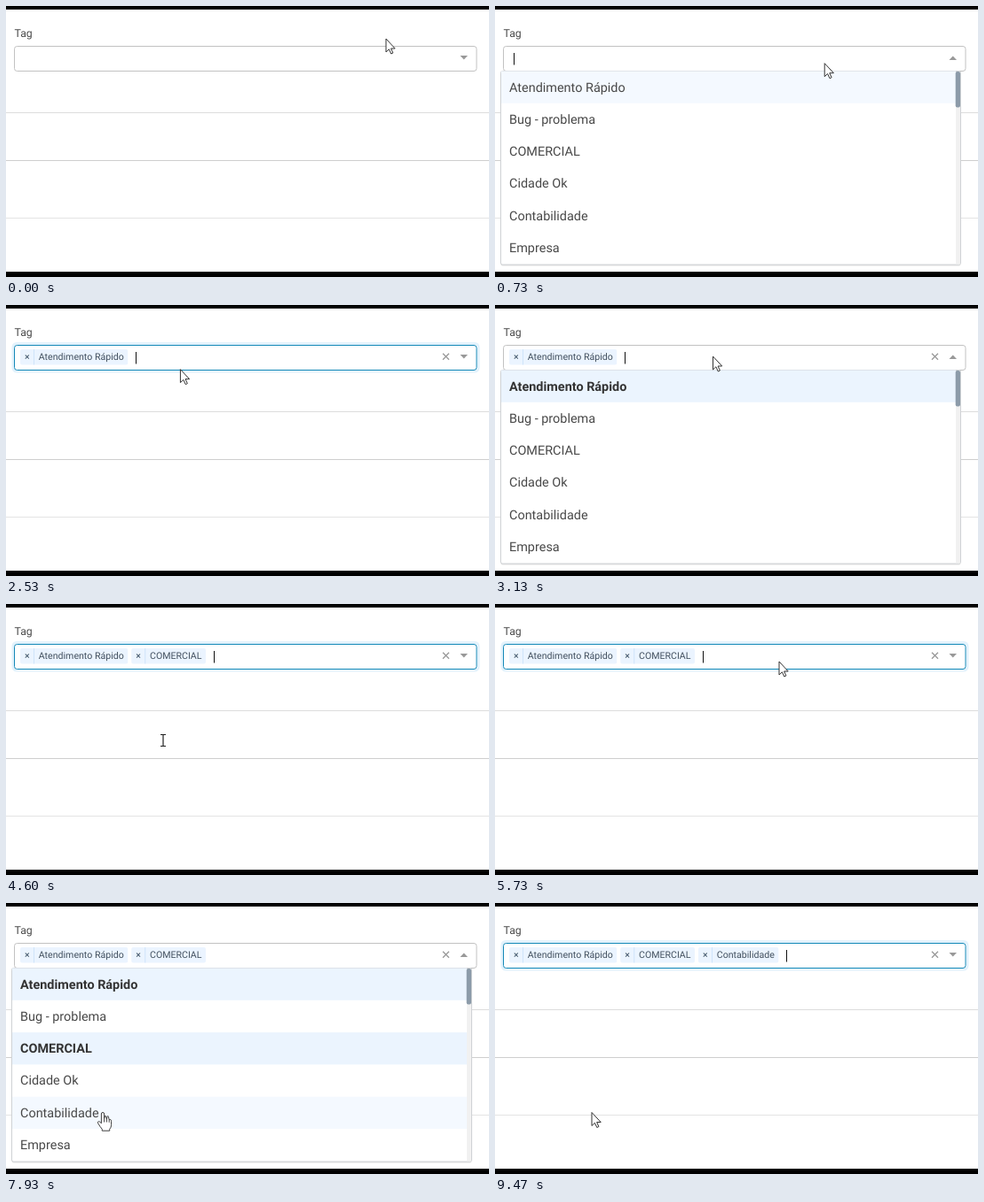
Animation of 544 by 306 pixels, one loop 9.99 s. Source, as an HTML page:

```html
<!DOCTYPE html>
<html lang="pt">
<head>
<meta charset="utf-8">
<title>Tag select</title>
<style>
html, body { margin: 0; width: 544px; height: 306px; overflow: hidden; background: #fff; }
svg { display: block; font-family: Roboto, sans-serif; text-rendering: geometricPrecision; }
</style>
</head>
<body>
<svg id="stage" width="544" height="306" viewBox="0 0 544 306"></svg>
<script>
const LOOP = 9990, STEP = 200 / 3, BLINK = 533;
const ROW = 36.3, MENU_TOP = 73.5, TAG_SIZE = 10.6;
const options = ['Atendimento Rápido', 'Bug - problema', 'COMERCIAL', 'Cidade Ok', 'Contabilidade', 'Empresa'];
const picks = [0, 2, 4];

// Clicks alternately open the menu and pick an option, which closes it.
const clicks = [470, 2000, 3000, 4600, 5800, 8130];

// Pointer moves: start, end, target x, target y
const home = [428, 37];
const moves = [
  [70, 330, 410, 60], [470, 1600, 121.5, 95], [2000, 2930, 245.5, 58], [3130, 4200, 177, 154],
  [4600, 5400, 320, 65], [6200, 6800, 117, 218], [6800, 7930, 109, 236.5]
];

const rect = (x, y, w, h, fill, more = '') =>
  `<rect x="${x}" y="${y}" width="${w}" height="${h}" fill="${fill}" ${more}/>`;
const text = (x, y, size, str, fill, weight = 400) =>
  `<text x="${x}" y="${y}" font-size="${size}" fill="${fill}" font-weight="${weight}">${str}</text>`;
const shape = (d, more) => `<path d="${d}" ${more}/>`;
const stroke = (color, width) => `fill="none" stroke="${color}" stroke-width="${width}"`;

const ruler = document.createElement('canvas').getContext('2d');
ruler.font = `${TAG_SIZE}px Roboto, sans-serif`;

function pointerAt(t) {
  let [x, y] = home;
  for (const [start, end, toX, toY] of moves) {
    const k = Math.min(1, Math.max(0, (t - start) / (end - start)));
    const ease = k * k * (3 - 2 * k);
    x += (toX - x) * ease;
    y += (toY - y) * ease;
  }
  return [x, y];
}

function field(open, chosen, focused, caretOn) {
  const active = focused && !open;
  let s = active ? rect(8, 43.5, 524, 31.5, 'none', 'rx="4" stroke="#e3f2fc" stroke-width="3"') : '';
  s += rect(9.5, 45.5, 520.5, 28, '#fff', `rx="3" stroke="${active ? '#1489b8' : '#c2c2c2'}"`);

  let left = 16;
  for (const option of chosen) {
    const name = options[option], width = ruler.measureText(name).width + 25.3;
    s += rect(left, 50, width, 17.5, '#ebf4ff', 'rx="2"')
      + shape(`M${left + 15.5} 50v17.5`, stroke('#cfe4fa', 1))
      + text(left + 5, 62.2, TAG_SIZE, '×', '#34495e')
      + text(left + 20.8, 62.2, TAG_SIZE, name, '#42505e');
    left += width + 4;
  }

  if (chosen.length) s += shape('M492 54.7l7 7m0-7l-7 7', stroke('#999', 1.3));
  s += shape(open ? 'M511.5 61h8.5l-4.25-4.5z' : 'M511.5 56h8.5l-4.25 4.5z', 'fill="#999"');
  if (caretOn) s += rect(Math.round(left) + 5, 53, 1, 13.5, '#111');
  return s;
}

function menu(chosen, hover) {
  let s = rect(6.5, MENU_TOP, 518, 220, '#e3e3e3', 'rx="2"')
    + rect(6.5, MENU_TOP, 518, 218.5, '#fff', 'rx="2" stroke="#cfd2d5"');
  options.forEach((name, i) => {
    const y = MENU_TOP + i * ROW, on = chosen.includes(i);
    if (on || i === hover) s += rect(7, y, 512, ROW, on ? '#ebf4fe' : '#f4f9ff');
    s += text(16, y + 23, 14.45, name, on ? '#333' : '#484848', on ? 700 : 400);
  });
  return s + rect(519, 74, 5, 217.5, '#f1f1f1') + rect(518.7, 74, 5.3, 40.5, '#8c9ba9', 'rx="2"');
}

const outline = 'fill="#fff" stroke="#333" stroke-linejoin="round"';
const pointers = {
  arrow: shape('M0 0V15L3.4 11.8 5.8 17 7.9 16 5.6 11H10.2Z', outline),
  hand: shape('M-1.7 13V1.6Q-1.7 0 0 0T1.7 1.6V7.5Q3-.2 4.7 8Q6-.2 7.7 9Q10.2 7.6 10.2 10.5V15'
    + 'Q10.2 18 8.2 20V22H-.8V20Q-3 17.5-5.6 13.2Q-6.8 11-4.8 10.8Q-3.6 10.8-1.7 13Z',
    outline + ' transform="scale(.94)"') + shape('M1.6 7v4M4.4 7.5v3.5M7.2 8.3v3', stroke('#333', 0.9)),
  beam: shape('M-3-6.5H3M0-6.5V6.5M-3 6.5H3', stroke('#222', 1.2))
};

function render(t) {
  const past = clicks.filter(c => c <= t);
  const focused = past.length > 0, open = past.length % 2 === 1;
  const sinceClick = t - past.at(-1);
  const chosen = picks.slice(0, Math.floor(past.length / 2));
  const caretOn = focused && Math.floor(sinceClick / BLINK) % 2 === 0;

  const [x, y] = pointerAt(t);
  const inMenu = open && y > MENU_TOP;
  const hover = inMenu ? Math.floor((y - MENU_TOP) / ROW) : 0;
  const kind = inMenu ? 'hand' : !open && sinceClick < 270 ? 'beam' : 'arrow';

  return rect(0, 0, 544, 306, '#fff')
    + rect(0, 120, 544, 1, '#dcdcdc') + rect(0, 174, 544, 1, '#cfcfcf') + rect(0, 239, 544, 1, '#e4e4e4')
    + text(9.5, 34.9, 12.3, 'Tag', '#4a4a4a')
    + field(open, chosen, focused, caretOn)
    + (open ? menu(chosen, hover) : '')
    + `<g transform="translate(${x} ${y})">${pointers[kind]}</g>`
    + rect(0, 0, 544, 4, '#000') + rect(0, 300, 544, 6, '#000');
}

const stage = document.getElementById('stage');
let shown = -1;
function tick() {
  // The picture advances in 15 steps per second, rounded to hundredths.
  const step = Math.floor(((performance.now() % LOOP) + 4) / STEP);
  if (step !== shown) {
    shown = step;
    stage.innerHTML = render(Math.round(step * STEP / 10) * 10);
  }
  requestAnimationFrame(tick);
}
tick();
</script>
</body>
</html>
```
